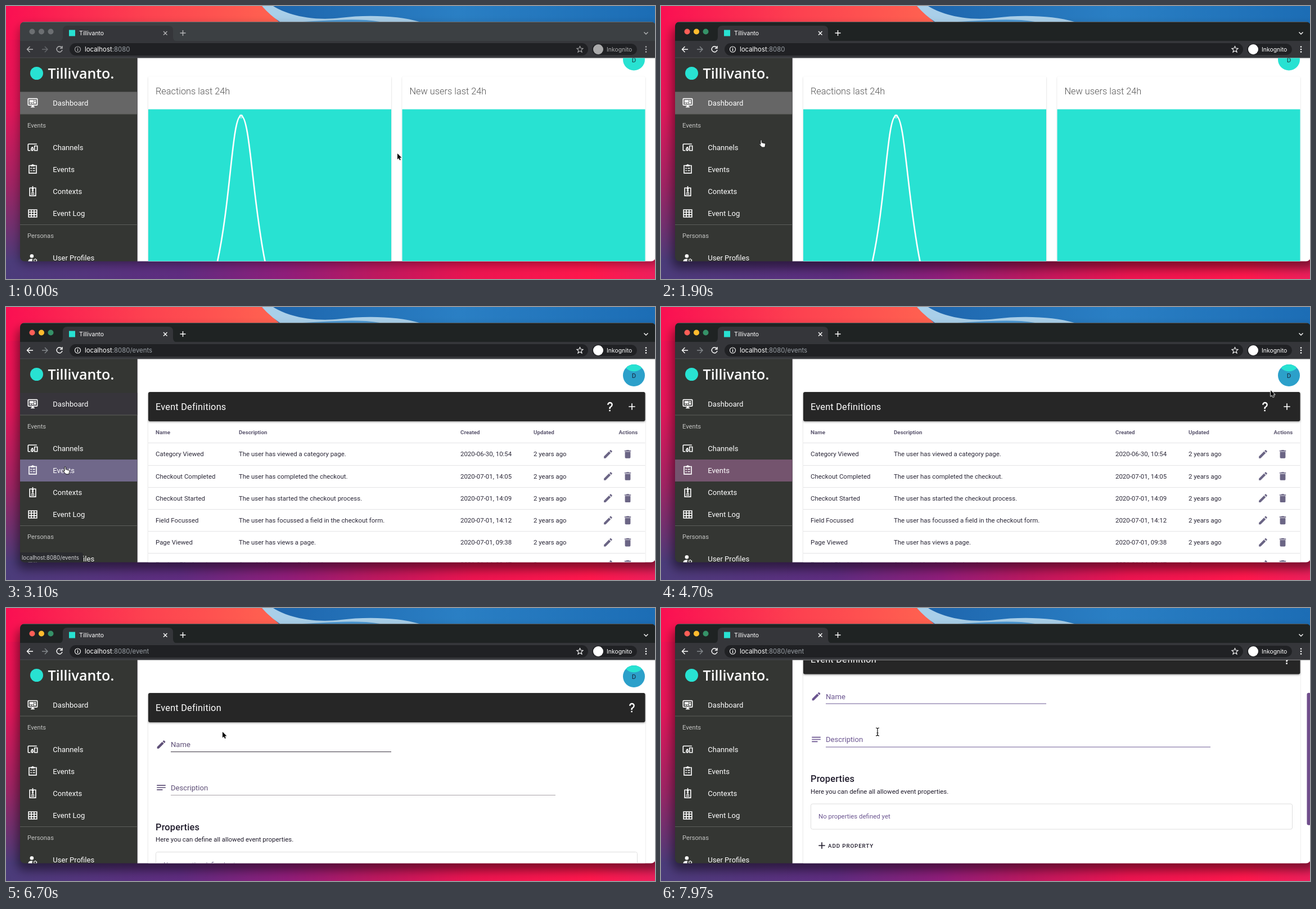
These frames come from a looping animation (1154x485 px, 8 s). An HTML page:

```html
<!DOCTYPE html>
<html lang="en">
<head>
<meta charset="utf-8">
<title>Event definitions</title>
<style>
@property --scroll { syntax: '<number>'; inherits: true; initial-value: 0; }
html, body { margin: 0; width: 100%; height: 100%; overflow: hidden; }
svg { display: block; width: 1154px; height: 485px; animation: scroll 8s linear infinite; }
text { font-family: Roboto, sans-serif; font-size: 11.43px; dominant-baseline: central; white-space: pre; }
.ui text, text.ui { font-family: Inter, sans-serif; font-size: 10.4px; fill: #fff; }
.ui text.url { font-size: 11.4px; }
.url tspan, .dim { fill: #9aa0a6; }
.logo { font: 600 25px 'Open Sans', sans-serif; fill: #fff; }
.nav text { font-size: 13.07px; fill: #fff; }
.nav .sub { font-size: 11.2px; fill: #c4c5c3; }
.nav use { color: #fff; }
.light { font-size: 16.33px; font-weight: 300; fill: #555; }
.title { font-size: 16.33px; letter-spacing: .0125em; fill: #fff; }
.rows { fill: #2b2838; }
.rows .head { font-size: 9.8px; font-weight: 700; fill: #5d5870; }
.rows use { color: #6b6585; }
.label { font-size: 13.07px; }
.i { transform: scale(.8166) translate(-12px, -12px); fill: currentColor; }
.s { fill: none; stroke: currentColor; stroke-width: 2; }
.line { fill: none; stroke: #fff; stroke-width: 1.4; }

.early, .mid, .late, .idle, .live, .tip, .help, .arrow, .hand, .beam, .bar, .dash, .active, .lines path, .chrome, .strip { animation: 8s step-end infinite; }
.early { animation-name: early; }
.mid { animation-name: mid; }
.late { animation-name: late; }
.idle { animation-name: idle; }
.live { animation-name: live; }
.tip { animation-name: tip; }
.help { animation-name: help; }
.arrow { animation-name: arrow; }
.hand { animation-name: hand; }
.beam { animation-name: beam; }
.bar { animation-name: bar; transform: translateY(calc(var(--scroll) * .675px)); }
.dash { animation-name: dash; }
.active { animation-name: active; }
.strip { animation-name: strip; }
.chrome { animation-name: chrome; }
.ink { fill: currentColor; animation: ink 8s step-end infinite; }
.lines .name { animation-name: name; }
.lines .desc { animation-name: desc; }
.form { transform: translateY(calc(var(--scroll) * -1px)); }
.cursor { animation: cursor 8s linear infinite; }

@keyframes early { 0% { visibility: visible } 36.25%, 100% { visibility: hidden } }
@keyframes mid { 0%, 68.75%, 100% { visibility: hidden } 36.25% { visibility: visible } }
@keyframes late { 0% { visibility: hidden } 68.75%, 100% { visibility: visible } }
@keyframes idle { 0% { visibility: visible } 13.75%, 100% { visibility: hidden } }
@keyframes live { 0% { visibility: hidden } 13.75%, 100% { visibility: visible } }
@keyframes tip { 0%, 43.75%, 100% { visibility: hidden } 30% { visibility: visible } }
@keyframes help { 0%, 74.625%, 100% { visibility: hidden } 68.75% { visibility: visible } }
@keyframes arrow { 0%, 43.75%, 70% { visibility: visible } 23.75%, 62.5%, 98.75%, 100% { visibility: hidden } }
@keyframes hand { 0%, 43.75%, 70%, 100% { visibility: hidden } 23.75%, 62.5% { visibility: visible } }
@keyframes beam { 0% { visibility: hidden } 98.75%, 100% { visibility: visible } }
@keyframes bar { 0% { visibility: hidden; fill: #8a5070 } 88.75% { visibility: visible; fill: #8a5070 } 96%, 100% { visibility: visible; fill: #6f4d8b } }
@keyframes dash { 0% { fill: #666 } 36.25% { fill: #37353b } 43.75%, 100% { fill: transparent } }
@keyframes active { 0%, 68.75%, 100% { fill: transparent } 30% { fill: #484a47 } 36.25% { fill: #70688a } 43.75% { fill: #74546e } }
@keyframes strip { 0% { fill: #3c4043 } 13.75%, 100% { fill: #1f2323 } }
@keyframes chrome { 0% { opacity: .62 } 13.75%, 100% { opacity: 1 } }
@keyframes ink { 0% { color: #5f5078 } 87.5% { color: #6d4470 } 96%, 100% { color: #6b5590 } }
@keyframes name { 0% { stroke: #9a9da8 } 82.5% { stroke: #3a3340 } 96%, 100% { stroke: #6d5a94 } }
@keyframes desc { 0% { stroke: #8fa3a8 } 82.5% { stroke: #a8a2a8 } 96%, 100% { stroke: #6d5a94 } }
@keyframes scroll {
  0%, 87.5% { --scroll: 0 } 88.75% { --scroll: 18 } 90% { --scroll: 42.5 } 92.5% { --scroll: 64 }
  95% { --scroll: 76 } 97.5% { --scroll: 83 } 99.6%, 100% { --scroll: 85.5 }
}
@keyframes cursor {
  0%, 1.25% { transform: translate(696px, 262px) }
  3.75%, 17.5% { transform: translate(640px, 240px) }
  20%, 22.5% { transform: translate(563px, 208px) }
  23.75% { transform: translate(178px, 238px) }
  28.75% { transform: translate(122px, 272px) }
  33.75%, 41.25% { transform: translate(105px, 284px) }
  47% { transform: translate(430px, 240px) }
  52.5%, 55% { transform: translate(760px, 188px) }
  57.5% { transform: translate(1000px, 156px) }
  58.75% { transform: translate(1084px, 148px) }
  62.5% { transform: translate(1108px, 168px) }
  65%, 68% { transform: translate(1112px, 173px) }
  70%, 74% { transform: translate(1064px, 166px) }
  80% { transform: translate(425px, 238px) }
  83.75%, 100% { transform: translate(385px, 220px) }
}
</style>
</head>
<body>
<svg viewBox="0 0 1154 485">
  <defs>
    <linearGradient id="coral"><stop stop-color="#fa0f52"/><stop offset=".5" stop-color="#fd4250"/><stop offset="1" stop-color="#ff6550"/></linearGradient>
    <linearGradient id="sky"><stop stop-color="#1d64ac"/><stop offset=".5" stop-color="#2a7fc4"/><stop offset="1" stop-color="#1c6db5"/></linearGradient>
    <linearGradient id="side" x2="0" y2="1"><stop stop-color="#fa0f52"/><stop offset=".4" stop-color="#e31659"/><stop offset=".7" stop-color="#a02464"/><stop offset="1" stop-color="#4b3c7a"/></linearGradient>
    <linearGradient id="floor"><stop stop-color="#4b3c7a"/><stop offset=".27" stop-color="#5f2c80"/><stop offset=".43" stop-color="#8f1d7a"/><stop offset=".57" stop-color="#bd185f"/><stop offset=".72" stop-color="#ec1450"/><stop offset=".9" stop-color="#ff174c"/><stop offset="1" stop-color="#ee1f5c"/></linearGradient>
    <filter id="soft" x="-10%" y="-20%" width="120%" height="140%"><feGaussianBlur stdDeviation="9"/></filter>
    <filter id="lift" x="-5%" y="-20%" width="110%" height="150%"><feDropShadow dx="0" dy="1.5" stdDeviation="1.6" flood-opacity=".35"/></filter>
    <filter id="card" x="-5%" y="-5%" width="110%" height="110%"><feDropShadow dx="0" dy="1" stdDeviation="1" flood-opacity=".22"/></filter>
    <clipPath id="frame"><rect x="25" y="28" width="1130" height="425.5" rx="8"/></clipPath>
    <clipPath id="page"><rect x="233.5" y="92.5" width="921" height="361"/></clipPath>
    <clipPath id="round"><circle cx="1116.5" cy="121.5" r="19.5"/></clipPath>

    <path id="pencil" class="i" d="M20.71 7.04C21.1 6.65 21.1 6 20.71 5.63L18.37 3.29C18 2.9 17.35 2.9 16.96 3.29L15.12 5.12L18.87 8.87M3 17.25V21H6.75L17.81 9.93L14.06 6.18Z"/>
    <path id="trash" class="i" d="M19 4H15.5L14.5 3H9.5L8.5 4H5V6H19M6 19A2 2 0 0 0 8 21H16A2 2 0 0 0 18 19V7H6Z"/>
    <path id="plus" class="i" d="M19 13H13V19H11V13H5V11H11V5H13V11H19Z"/>
    <path id="ask" class="i" d="M10 19H13V22H10V19M12 2C17.35 2.22 19.68 7.62 16.5 11.67C15.67 12.67 14.33 13.33 13.67 14.17C13 15 13 16 13 17H10C10 15.33 10 13.92 10.67 12.92C11.33 11.92 12.67 11.33 13.5 10.67C15.92 8.43 15.32 5.26 12 5A3 3 0 0 0 9 8H6A6 6 0 0 1 12 2Z"/>
    <path id="board" class="i" d="M21 16V4H3V16H21M21 2A2 2 0 0 1 23 4V16A2 2 0 0 1 21 18H14V20H16V22H8V20H10V18H3A2 2 0 0 1 1 16V4A2 2 0 0 1 3 2H21M5 6H14V11H5V6M15 6H19V8H15V6M19 9V14H15V9H19M5 12H9V14H5V12M10 12H14V14H10Z"/>
    <g id="devices"><path class="i s" d="M21 5H3Q2 5 2 6V18Q2 19 3 19H7M16 9H22V19H16ZM10 12H12V14M10 12V14M10 20V18M12 20V18"/><circle class="i s" cx="11" cy="16" r="2.2"/></g>
    <g id="list"><path class="i s" d="M4 4H20V20.5H4ZM7 10H10M7 15H10M12 10H17M12 15H17"/><path class="i" d="M8 5V2.5H10Q12 -.5 14 2.5H16V6H8Z"/></g>
    <g id="badge"><path class="i s" d="M5.5 5H18.5V22H5.5ZM12 1V6M8.5 18.5H15.5"/><path class="i" d="M8 16Q12 11 16 16ZM10 6H14V9H10Z"/><circle class="i" cx="12" cy="11" r="2"/></g>
    <path id="grid" class="i s" d="M3 4H21V20H3ZM3 9.3H21M3 14.6H21M9 4V20M15 4V20"/>
    <g id="person"><circle class="i" cx="10" cy="8" r="4"/><path class="i" d="M2 20Q2 14 10 14L12 14.3Q10 17 11.5 20Z"/><circle class="i s" cx="17.5" cy="17.5" r="3" stroke-dasharray="2.4 .75"/></g>
    <path id="notes" class="i" d="M2.5 6.2H21.5V8.2H2.5ZM2.5 11H21.5V13H2.5ZM2.5 15.8H15V17.8H2.5Z"/>
  </defs>

  <rect width="1154" height="485" fill="url(#floor)"/>
  <rect width="60" height="454" fill="url(#side)"/>
  <rect width="500" height="60" fill="url(#coral)"/>
  <path d="M455 0H1154V60H520Z" fill="url(#sky)"/>
  <path d="M455 0Q470 17 487 28H735C700 17 640 15 595 21C545 27 500 16 475 0Z" fill="#a9cfe9"/>
  <path d="M487 28C540 31 610 18 665 28Z" fill="#4b97d2"/>
  <g filter="url(#soft)">
    <rect class="idle" x="24" y="36" width="1140" height="422" rx="10" opacity=".4"/>
    <rect class="live" x="20" y="38" width="1146" height="428" rx="12" opacity=".48"/>
  </g>

  <g clip-path="url(#frame)">
    <rect class="strip" x="25" y="28" width="1130" height="35"/>
    <rect x="25" y="62" width="1130" height="31" fill="#35363a"/>
    <path d="M93 62.5Q101 62.5 101 55V43Q101 35 109 35H289Q297 35 297 43V55Q297 62.5 305 62.5Z" fill="#35363a"/>
    <path d="M25 28.5H1154" stroke="#fff" opacity=".22"/>
    <path d="M25 92H1154" stroke="#505256"/>
    <g class="idle" fill="#6c6f72"><circle cx="46.5" cy="45.5" r="5"/><circle cx="63" cy="45.5" r="5"/><circle cx="79.5" cy="45.5" r="5"/></g>
    <g class="live"><circle cx="46.5" cy="45.5" r="5" fill="#ff5f57"/><circle cx="63" cy="45.5" r="5" fill="#febc2e"/><circle cx="79.5" cy="45.5" r="5" fill="#359268"/></g>
    <rect x="113" y="66" width="922" height="22" rx="11" fill="#202124"/>
    <rect x="1042" y="67" width="80" height="20" rx="10" fill="#202124"/>
    <rect x="112" y="42.5" width="11" height="11" fill="#28e2d2"/>
    <g class="ui">
      <text x="130" y="48">Tillivanto</text>
      <text class="url early" x="140" y="77">localhost<tspan>:8080</tspan></text>
      <text class="url mid" x="140" y="77">localhost<tspan>:8080/events</tspan></text>
      <text class="url late" x="140" y="77">localhost<tspan>:8080/event</tspan></text>
      <g class="chrome">
        <text x="1068" y="77">Inkognito</text>
        <circle cx="1053" cy="77" r="9" fill="#fff"/>
        <g class="line">
          <path d="M280 45L286.500 51.500M286.500 45L280 51.500M309.500 48H319.500M314.500 43V53M1134.500 46.500L1138 50L1141.500 46.500"/>
          <path d="M48 77H38M42.500 72L37.500 77L42.500 82"/>
          <path d="M64 77H74M69 72L74 77L69 82" stroke="#85898d"/>
          <path d="M99 73.500A5 5 0 1 0 100 78M100 71V75H96"/>
          <circle cx="127.500" cy="77" r="5" stroke-width="1.100"/>
          <path d="M127.500 76V80M127.500 74V75.200"/>
          <path d="M1020.500 71.500L1022.100 75.100L1026 75.500L1023 78.100L1024 82L1020.500 79.900L1017 82L1018 78.100L1015 75.500L1018.900 75.100Z" stroke-width="1.100"/>
        </g>
        <g fill="#fff"><circle cx="1138" cy="72.500" r="1.300"/><circle cx="1138" cy="77" r="1.300"/><circle cx="1138" cy="81.500" r="1.300"/></g>
      </g>
    </g>

    <rect x="233.500" y="92.500" width="921" height="362" fill="#fff"/>
    <g clip-path="url(#page)">
      <g class="early">
        <circle cx="1116.500" cy="95" r="19.500" fill="#28e2d2"/>
        <text x="1116.500" y="95.500" text-anchor="middle" fill="#17343a">D</text>
        <g fill="#fff" filter="url(#card)"><rect x="253" y="125" width="432" height="350" rx="3"/><rect x="704.500" y="125" width="432" height="350" rx="3"/></g>
        <path d="M253 183.500H685V460H253ZM704.500 183.500H1136.500V460H704.500Z" fill="#28e2d2"/>
        <text class="light" x="266" y="151">Reactions last 24h</text>
        <text class="light" x="717.500" y="151">New users last 24h</text>
        <path class="line" style="stroke-width:2.600" d="M375.500 456C400 345 402 195 418 195C434 195 438 345 461 456"/>
        <circle class="line" style="stroke-width:1" cx="418" cy="196" r="3"/>
      </g>

      <g class="form">
        <g class="live">
          <g class="mid"><use href="#avatar"/></g>
          <g class="late"><use href="#avatar"/></g>
        </g>
        <g class="mid">
          <rect x="253" y="151" width="883.500" height="330" fill="#fff" filter="url(#card)"/>
          <rect x="253" y="151" width="883.500" height="52" rx="3" fill="#262626" filter="url(#lift)"/>
          <text class="title" x="266" y="177">Event Definitions</text>
          <g color="#fff"><use href="#ask" x="1074" y="177"/><use href="#plus" x="1113" y="177"/></g>
          <g class="rows" id="rows"></g>
        </g>
        <g class="late">
          <rect x="253" y="151" width="883.500" height="500" fill="#fff" filter="url(#card)"/>
          <rect x="253" y="151" width="883.500" height="52" rx="3" fill="#262626" filter="url(#lift)"/>
          <text class="title" x="266" y="177">Event Definition</text>
          <circle class="help" cx="1113" cy="177" r="19.500" fill="#3b3b3b"/>
          <use href="#ask" x="1113" y="177" color="#fff"/>
          <g class="ink">
            <use href="#pencil" x="276" y="242.500"/>
            <use href="#notes" x="276" y="319"/>
            <text class="label" x="293" y="242.500">Name</text>
            <text class="label" x="293" y="319">Description</text>
            <text x="280" y="455.500">No properties defined yet</text>
          </g>
          <g class="lines"><path class="name" d="M293 255.500H685"/><path class="desc" d="M293 332.500H977"/></g>
          <g fill="#201c2c" color="#201c2c">
            <text class="title" style="font-weight:500;fill:#201c2c" x="266" y="389">Properties</text>
            <text x="266" y="411">Here you can define all allowed event properties.</text>
            <rect x="266.500" y="433.500" width="856" height="45" rx="3" fill="none" stroke="#dedede"/>
            <use href="#plus" x="286" y="507.500"/>
            <text x="297" y="507.500" style="font-size:9.800px;font-weight:500;letter-spacing:.089em">ADD PROPERTY</text>
          </g>
        </g>
      </g>
      <rect class="bar" x="1148.500" y="93" width="7" height="235" rx="3"/>
    </g>

    <rect x="25" y="92.500" width="208.500" height="362" fill="#343633"/>
    <circle cx="54.500" cy="119.500" r="11.500" fill="#28e2d2"/>
    <text class="logo" x="74.500" y="118.500">Tillivanto.</text>
    <rect class="dash" x="25" y="152.500" width="208.500" height="39.500"/>
    <rect class="active" x="25" y="271" width="208.500" height="39"/>
    <path d="M25 192H233.500M25 388.500H233.500" stroke="#5c5e5b"/>
    <g class="nav" id="nav"></g>
    <g class="tip">
      <path d="M25 436H133Q137 436 137 440V454H25Z" fill="#2b2c30"/>
      <text class="ui" style="font-size:9.660px;fill:#d5d6d8" x="28" y="445">localhost:8080/events</text>
    </g>
  </g>

  <g class="cursor" stroke-linejoin="round">
    <path class="arrow" d="M0 0V10.500L2.400 8.300L4.100 12L5.800 11.200L4.200 7.600H7.500Z" stroke="#fff" stroke-width="1.600" paint-order="stroke"/>
    <path class="hand" d="M-1 1A1.200 1.200 0 0 1 1.400 1V4.600L6.400 5.800Q8 6.200 7.900 7.800L7.300 11Q7 12 6.500 13H1.600Q-1 10 -3.600 7.600Q-3 6 -1 7.800Z" fill="#fff" stroke="#111"/>
    <path class="beam" d="M-3 -7Q0 -7 0 -5V5Q0 7 -3 7M3 -7Q0 -7 0 -5M0 5Q0 7 3 7M-1.500 2H1.500" fill="none" stroke="#111" stroke-width="1.200"/>
  </g>

  <defs>
    <g id="avatar">
      <circle cx="1116.500" cy="121.500" r="19.500" fill="#2ca0ca"/>
      <circle cx="1116.500" cy="95" r="19.500" fill="#28e2d2" clip-path="url(#round)"/>
      <text x="1116.500" y="122" text-anchor="middle" fill="#17243a">D</text>
    </g>
  </defs>
</svg>
<script>
const text = (x, y, s, cls = '') => `<text x="${x}" y="${y}" class="${cls}">${s}</text>`;
const icon = (id, x, y) => `<use href="#${id}" x="${x}" y="${y}"/>`;
const fill = (id, html) => { document.getElementById(id).innerHTML = html; };

const items = [
  ['board', 172, 'Dashboard'], ['devices', 251, 'Channels'], ['list', 290, 'Events'],
  ['badge', 329, 'Contexts'], ['grid', 368.5, 'Event Log'], ['person', 447.5, 'User Profiles']
];
fill('nav', text(38, 212, 'Events', 'sub') + text(38, 408.5, 'Personas', 'sub') +
  items.map(([id, y, name]) => icon(id, 47.5, y) + text(83.3, y, name)).join(''));

const events = [
  ['Category Viewed', 'The user has viewed a category page.', '2020-06-30, 10:54'],
  ['Checkout Completed', 'The user has completed the checkout.', '2020-07-01, 14:05'],
  ['Checkout Started', 'The user has started the checkout process.', '2020-07-01, 14:09'],
  ['Field Focussed', 'The user has focussed a field in the checkout form.', '2020-07-01, 14:12'],
  ['Page Viewed', 'The user has views a page.', '2020-07-01, 09:38'],
  ['Product Displayed', 'A product has been displayed.', '2021-01-14, 09:47']
];
const columns = [266, 414, 808, 938];
const heads = ['Name', 'Description', 'Created', 'Updated'];
fill('rows', heads.map((h, i) => text(columns[i], 222.5, h, 'head')).join('') + text(1089.5, 222.5, 'Actions', 'head') +
  events.map((row, i) => {
    const y = 261.3 + i * 39.2;
    return `<path d="M253 ${Math.round(y - 20) + .5}H1136.5" stroke="#e4e4e6"/>` +
      [...row, '2 years ago'].map((s, k) => text(columns[k], y, s)).join('') +
      icon('pencil', 1070.5, y) + icon('trash', 1105.5, y);
  }).join(''));
</script>
</body>
</html>
```
